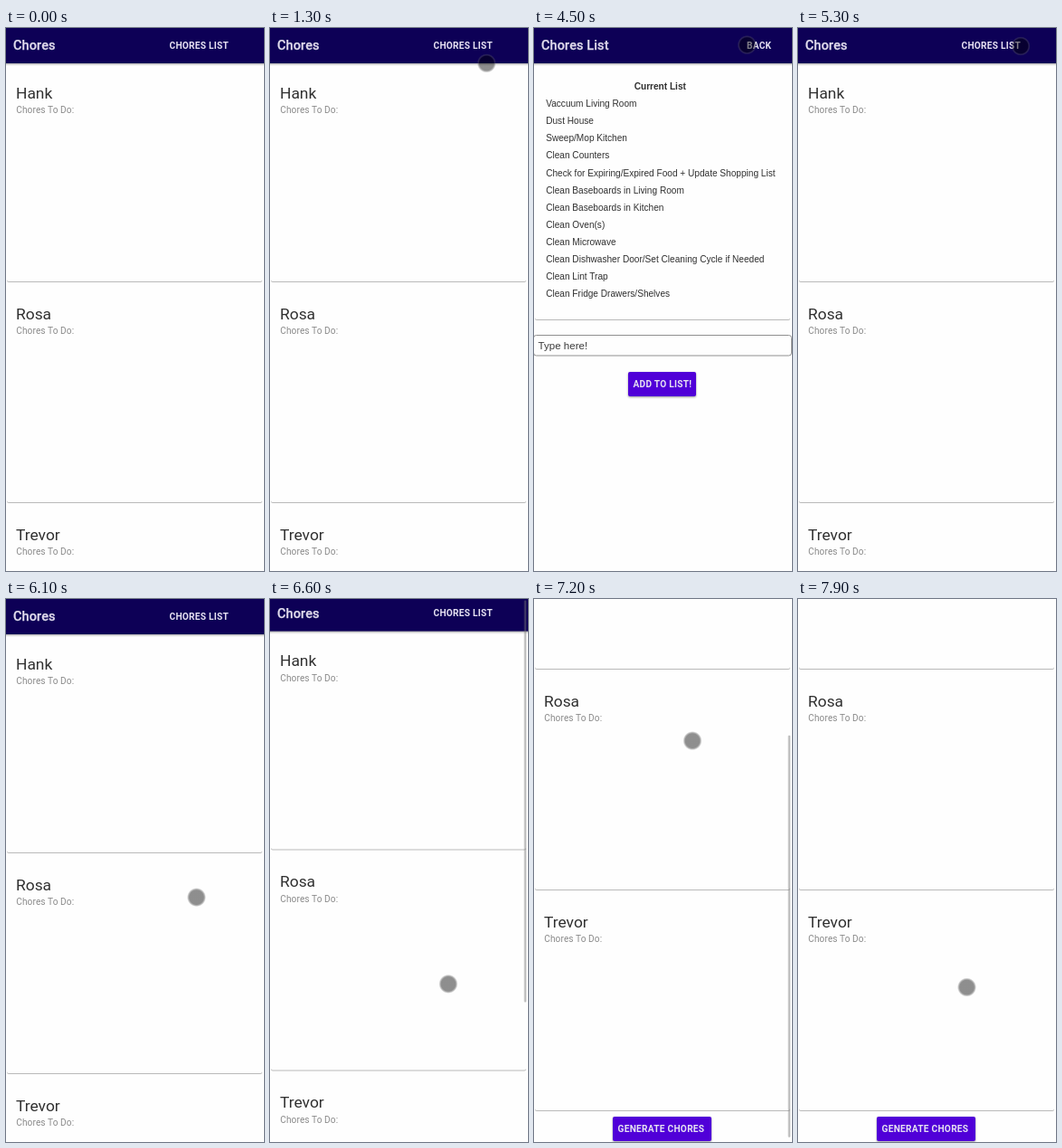
An HTML page for the animation above (8000 ms loop, 285 by 600 pixels).

```html
<!DOCTYPE html>
<html lang="en">
<head>
<meta charset="utf-8">
<title>Chores</title>
<style>
  html, body { margin: 0; width: 100%; height: 100%; overflow: hidden; background: #fefefe; }
  svg { display: block; }
  text { font-family: Roboto, sans-serif; fill: #303030; }
  .bar { fill: #0d0056; filter: drop-shadow(0 1.5px 1.2px rgba(0, 0, 0, .4)); }
  .title { font-size: 14.5px; font-weight: 500; letter-spacing: .1px; fill: #e0dcec; stroke: #e0dcec; stroke-width: .25px; }
  .label { font-size: 10.15px; font-weight: 700; letter-spacing: .27px; fill: #e6e2f2; }
  .card { fill: #fefefe; filter: drop-shadow(0 1.6px .6px rgba(0, 0, 0, .27)); }
  .button { fill: #5000d8; filter: drop-shadow(0 1px .8px rgba(0, 0, 0, .4)); }
  .name { font-size: 17.4px; }
  .sub { font-size: 10.15px; letter-spacing: .08px; fill: #8a8a8a; }
  .item, .head, .hint { font-family: "Liberation Sans", Arial, sans-serif; font-size: 10.1px; }
  .head { font-weight: 700; }
  .hint { font-size: 11.6px; fill: #3c3c3c; }
  .field { fill: #fefefe; stroke: #8f8f8f; }
  #thumb { fill: #767676; fill-opacity: .45; }
</style>
</head>
<body>
<svg width="285" height="600" viewBox="0 0 285 600">
  <radialGradient id="soft">
    <stop offset=".74" stop-color="#000" stop-opacity=".44"/>
    <stop offset=".86" stop-color="#555" stop-opacity=".4"/>
    <stop offset="1" stop-color="#888" stop-opacity="0"/>
  </radialGradient>
  <g id="home"></g>
  <g id="list"></g>
  <rect id="thumb" x="280.7" width="2.5" height="444" rx="1"/>
  <circle id="touch" r="10.6" fill="url(#soft)"/>
</svg>
<script>
const LOOP = 8000, STEP = 100, HEIGHT = 600, MAX_SCROLL = 203, CARD_PITCH = 244;
const people = ['Hank', 'Rosa', 'Trevor'];
const chores = [
  'Vaccuum Living Room', 'Dust House', 'Sweep/Mop Kitchen', 'Clean Counters',
  'Check for Expiring/Expired Food + Update Shopping List',
  'Clean Baseboards in Living Room', 'Clean Baseboards in Kitchen',
  'Clean Oven(s)', 'Clean Microwave',
  'Clean Dishwasher Door/Set Cleaning Cycle if Needed',
  'Clean Lint Trap', 'Clean Fridge Drawers/Shelves'
];

const [home, list, thumb, touch] =
  ['home', 'list', 'thumb', 'touch'].map(id => document.getElementById(id));

const text = (style, x, y, words) => `<text class="${style}" x="${x}" y="${y}">${words}</text>`;
const box = (style, x, y, w, h, r = 2) =>
  `<rect class="${style}" x="${x}" y="${y}" width="${w}" height="${h}" rx="${r}"/>`;
const header = (title, link, linkX) =>
  box('bar', -3, -5, 291, 44, 0) + text('title', 8, 24, title) + text('label', linkX, 22.8, link);
const button = (x, y, w, words) =>
  box('button', x, y, w, 27) + text('label', x + 5.5, y + 17.3, words);

home.innerHTML = people.map((name, i) => {
  const y = 43 + CARD_PITCH * i;
  return box('card', 1, y, 282, 237) + text('name', 11, y + 34.5, name) +
    text('sub', 11.3, y + 51, 'Chores To Do:');
}).join('') + header('Chores', 'CHORES LIST', 180.5) + button(87, 775, 109, 'GENERATE CHORES');

list.innerHTML = box('card', 1, 43, 282, 279) + text('head', 110.7, 68, 'Current List') +
  chores.map((chore, i) => text('item', 13.2, 87.2 + 19.09 * i, chore)).join('') +
  box('field', -.5, 339.5, 285, 22.5, 3) + text('hint', 4.5, 355, 'Type here!') +
  button(104, 380, 75, 'ADD TO LIST!') + header('Chores List', 'BACK', 235);

const progress = (t, start, end) => Math.min(1, Math.max(0, (t - start) / (end - start)));
const easeOut = p => 1 - (1 - p) ** 2;
const easeInOut = p => p * p * (3 - 2 * p);

// The finger enters, taps both links, travels down, swipes up and returns.
const entry = { x: 270, y: 78 };
const moves = [
  { start: 1100, end: 1600, x: 222, y: 17, ease: easeOut },
  { start: 4400, end: 4700, x: 246, y: 20, ease: easeOut },
  { start: 5500, end: 6400, x: 198, y: 438, ease: easeInOut },
  { start: 6500, end: 7300, x: 174, y: 144, ease: easeInOut },
  { start: 7400, end: 7900, x: 186.5, y: 429, ease: easeInOut }
];

function fingerAt(t) {
  let { x, y } = entry;
  for (const move of moves) {
    const p = move.ease(progress(t, move.start, move.end));
    x += (move.x - x) * p;
    y += (move.y - y) * p;
  }
  return { x, y };
}

const show = (node, on) => node.setAttribute('visibility', on ? 'visible' : 'hidden');

function draw(now) {
  const t = Math.floor((now % LOOP) / STEP) * STEP;
  const onList = t >= 1800 && t < 5300;
  const scroll = MAX_SCROLL * easeInOut(progress(t, 6555, 7140));
  const finger = fingerAt(t);

  show(home, !onList);
  show(list, onList);
  home.setAttribute('transform', `translate(0 ${-scroll})`);

  show(thumb, t >= 6600);
  thumb.setAttribute('y', scroll * HEIGHT / (HEIGHT + MAX_SCROLL) - 1);
  thumb.setAttribute('opacity', 1 - progress(t, 7500, 7800));

  show(touch, t >= 1100);
  touch.setAttribute('cx', finger.x);
  touch.setAttribute('cy', finger.y);
  requestAnimationFrame(draw);
}
draw(performance.now());
</script>
</body>
</html>
```
